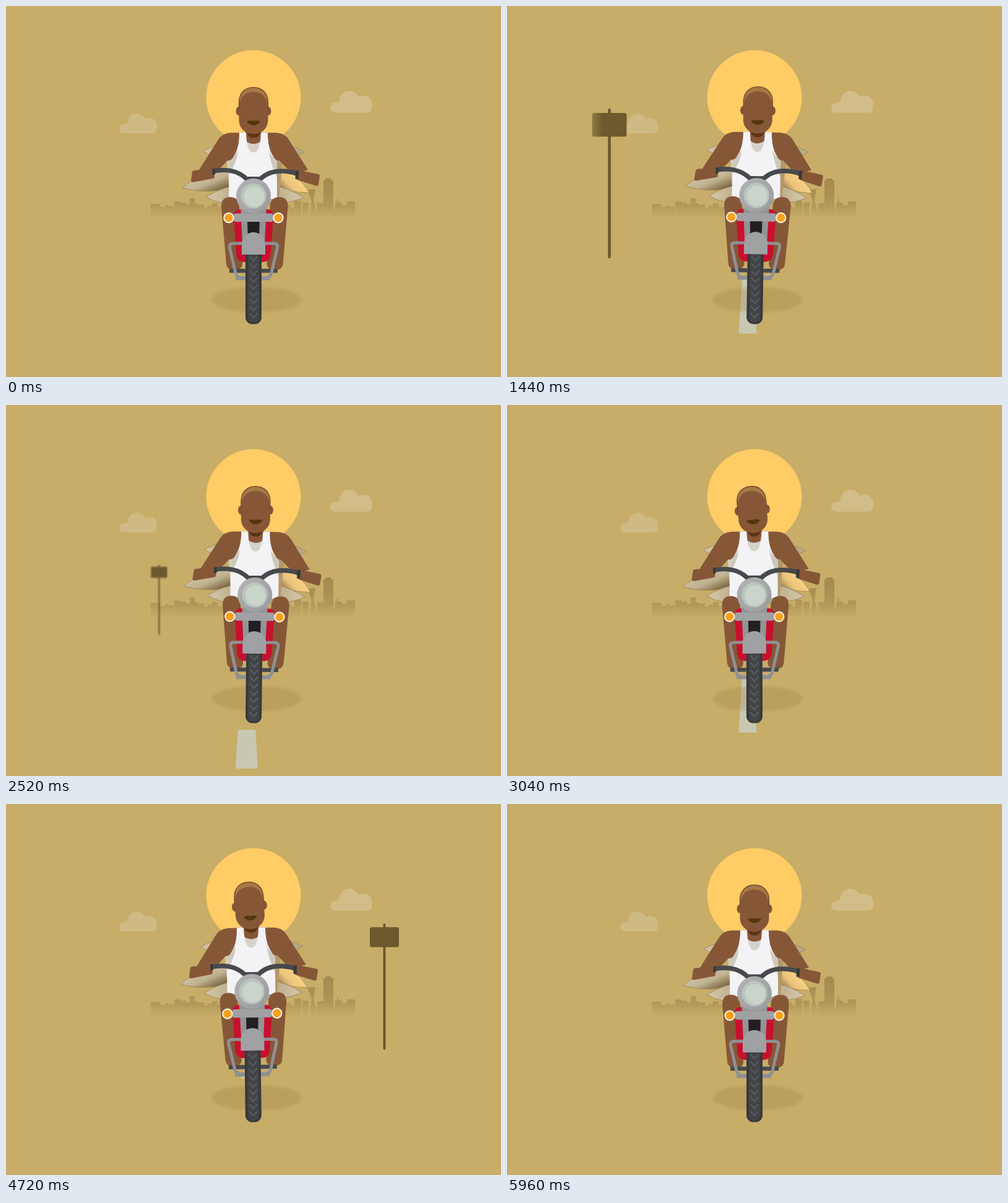
Recreate the animation shown at these times as an HTML page with a canvas. Size 800 px wide and 600 px high, loop 6000 ms.

```html
<!DOCTYPE html>
<html lang="en">
<head>
<meta charset="utf-8">
<title>Desert rider</title>
<style>
html, body { margin: 0; width: 100%; height: 100%; overflow: hidden; background: #c7ad68; }
canvas { display: block; width: 800px; height: 600px; }
</style>
</head>
<body>
<canvas id="stage" width="800" height="600"></canvas>
<script>
const ctx = document.getElementById('stage').getContext('2d');
const LOOP = 6000, STEP = 40, TAU = Math.PI * 2, RAD = Math.PI / 180;
const SKIN = '#865737', GREY = '#a0a1a3', DARK = '#47494c', SIGN = '108,89,45';

const clamp = (v, a = 0, b = 1) => Math.min(b, Math.max(a, v));
const smooth = u => u * u * (3 - 2 * u);

// Eased value through [time, value] keys
function track(t, keys) {
  for (let i = 1; i < keys.length; i++) {
    const [t0, a] = keys[i - 1], [t1, b] = keys[i];
    if (t <= t1) return a + (b - a) * smooth(clamp((t - t0) / (t1 - t0)));
  }
  return keys[keys.length - 1][1];
}

function shape(d, fill, stroke, width = 1) {
  const p = new Path2D(d);
  if (fill) { ctx.fillStyle = fill; ctx.fill(p); }
  if (stroke) { ctx.strokeStyle = stroke; ctx.lineWidth = width; ctx.stroke(p); }
}

function box(x, y, w, h, r, fill) {
  ctx.fillStyle = fill;
  ctx.beginPath();
  ctx.roundRect(x, y, w, h, r);
  ctx.fill();
}

function oval(x, y, rx, ry, fill) {
  ctx.fillStyle = fill;
  ctx.beginPath();
  ctx.ellipse(x, y, rx, ry, 0, 0, TAU);
  ctx.fill();
}

function ramp(x0, y0, x1, y1, ...stops) {
  const g = ctx.createLinearGradient(x0, y0, x1, y1);
  stops.forEach((c, i) => g.addColorStop(i / (stops.length - 1), c));
  return g;
}

// Draws once as is and once mirrored about an axis
function pair(draw, axis = 400) {
  draw();
  ctx.save();
  ctx.translate(2 * axis, 0);
  ctx.scale(-1, 1);
  draw();
  ctx.restore();
}

function cloud(x, y, k, fill) {
  ctx.save();
  ctx.translate(x, y);
  ctx.scale(k, k);
  ctx.fillStyle = fill;
  ctx.beginPath();
  ctx.roundRect(0, 17.5, 61, 14.5, 7.2);
  for (const [cx, cy, r] of [[15, 23, 7.5], [28, 15, 14.7], [48.5, 19.5, 12.5]]) {
    ctx.moveTo(cx + r, cy);
    ctx.arc(cx, cy, r, 0, TAU);
  }
  ctx.fill();
  ctx.restore();
}

// x, top, width
const blocks = [
  [234, 320, 15], [249, 325, 9], [258, 322, 4], [262, 324, 9], [272, 316, 10], [282, 318, 9],
  [291, 321, 6], [297, 311, 8], [305, 319, 4], [309, 321, 11], [320, 326, 6], [326, 323, 7],
  [333, 319, 9], [342, 325, 12], [446, 322, 14], [460, 326, 6], [466, 315, 11], [479, 318, 10],
  [503, 319, 10], [513, 282, 16], [516, 279, 10], [529, 329, 3], [532, 318, 11], [535, 312, 2],
  [543, 322, 8], [551, 316, 13]
];

function city() {
  const fill = ramp(0, 278, 0, 343, 'rgba(140,113,60,.58)', 'rgba(140,113,60,.5)',
    'rgba(140,113,60,.36)', 'rgba(140,113,60,0)');
  ctx.fillStyle = fill;
  ctx.beginPath();
  for (const [x, y, w] of blocks) ctx.rect(x, y, w, 343 - y);
  ctx.fill();
  shape('M487 297 L500 296 L497 315 L504 343 H490 L494 316 Z', fill);
}

function scenery() {
  ctx.fillStyle = '#c7ad68';
  ctx.fillRect(0, 0, 800, 600);
  oval(400, 148, 76.5, 76.5, '#ffcc66');
  cloud(183, 174, 1, '#d0ba84');
  cloud(524, 137, 1.11, '#d2bd88');
  city();
}

function shadow() {
  ctx.save();
  ctx.filter = 'blur(2px)';
  oval(405, 475, 72, 20, 'rgba(150,122,62,.26)');
  ctx.restore();
}

// Road sign that shrinks towards the horizon; hidden near the outer edge
function sign(t, start, x0, dx, edge, inner) {
  const s = 1 - 0.000385 * (t - start);
  if (s < 0.17 || s > 1.31) return;
  const x = x0 + dx * s, y = v => 340 + v * s;
  const fill = ramp(edge, 0, inner, 0, `rgba(${SIGN},0)`, `rgba(${SIGN},1)`);
  ctx.save();
  ctx.globalAlpha = clamp((s - 0.18) / 0.15);
  if (s < 0.62) ctx.filter = `blur(${clamp((0.62 - s) * 9, 0, 1)}px)`;
  ctx.fillStyle = fill;
  ctx.beginPath();
  ctx.roundRect(x - 3 * s, y(-222), 6 * s, 309 * s, 3 * s);
  ctx.roundRect(x - 35.5 * s, y(-213), 71 * s, 49 * s, 5 * s);
  ctx.fill();
  ctx.restore();
}

function road(t) {
  const phase = (t + 371) % 400;
  const top = 588 - 0.69 * phase;
  const bottom = 285 + (top - 285) / 0.643;
  const y0 = Math.max(top, 440), y1 = Math.min(bottom, 588);
  const half = y => 18 * (y - 285) / 303;
  if (y1 > y0) {
    shape(`M${389 - half(y0)} ${y0} L${389 + half(y0)} ${y0} ` +
          `L${389 + half(y1)} ${y1} L${389 - half(y1)} ${y1} Z`, '#c8c7b2');
  }
  // Brief crack at the roadside
  if (t >= 840 && t < 960) {
    const y = 492 - 0.7 * (t - 880), end = Math.min(588, y + 96);
    const at = v => 341.5 - (v - 492) * 0.344;
    shape(`M${at(y)} ${y} L${at(end)} ${end}`, null, '#55482c', 1);
  }
}

function leaves() {
  const line = '#8f7a4e';
  const pale = ramp(318, 0, 372, 0, '#d2c5a3', '#b9a987');
  shape('M318 235 Q333 225 352 225 L356 250 Q338 246 318 235 Z', pale, line, 0.7);
  shape('M483 236 Q466 226 448 225 L444 250 Q464 246 483 236 Z', pale, line, 0.7);
  shape('M285 294 Q312 270 366 262 L374 290 Q330 307 285 294 Z',
    ramp(318, 272, 332, 304, '#d0c4a6', '#bfb08e', '#7c6742'), line, 0.7);
  shape('M490 302 Q474 272 434 255 L426 286 Q452 302 490 302 Z',
    ramp(474, 276, 444, 304, '#fbd384', '#eac47c', '#75603c'), line, 0.7);
  shape('M323 309 Q345 294 378 289 L384 322 Q352 324 323 309 Z',
    ramp(335, 0, 378, 0, '#cfc2a2', '#b6a684'), line, 0.7);
  shape('M481 310 Q458 294 424 288 L418 320 Q452 322 481 310 Z',
    ramp(468, 0, 426, 0, '#cfc2a2', '#b6a684'), line, 0.7);
}

function torso() {
  shape('M374 204 L426 204 L443 250 L438 312 L362 312 L357 250 Z', '#d3cdbd');
  shape('M432 246 L447 252 L441 312 L430 312 Z', '#b3986a');
  shape('M387 203 H413 V222 Q400 240 387 222 Z', SKIN);
  shape('M387 218 Q400 228 413 218 L409 233 Q400 242 391 233 Z', '#d6d2ca');
  shape('M376 205 H388 Q389 237 400 237 Q411 237 412 205 H424 Q425 234 438 247 ' +
        'L438 312 H360 L361 250 Q376 232 376 205 Z', '#f3f3f5');
  shape('M361 249 Q371 242 374 234 Q376 246 361 272 Z', '#cfc9bd');
  shape('M438 249 Q428 242 425 234 Q426 250 438 278 Z', '#cfc9bd');
}

function arms() {
  pair(() => shape('M377 205 H363 Q349 206 343 216 L312 265 L337 272 L358 250 ' +
    'Q364 251 368 243 Q377 230 377 205 Z', SKIN));
  ctx.lineJoin = 'round';
  shape('M304 269 L332 266 L334 276 L302 282 Z', SKIN, SKIN, 6);
  shape('M475 269 L504 275 L502 288 L473 279 Z', SKIN, SKIN, 6);
}

function head(tilt) {
  box(389, 190, 22, 25, 9, SKIN);
  shape('M389 204 Q400 210 411 204 Q409 213 400 213 Q391 213 389 204 Z', '#5a3413');
  ctx.save();
  ctx.translate(400, 206);
  ctx.rotate(tilt * RAD);
  ctx.translate(-400, -206);
  oval(376, 170, 4.5, 7, SKIN);
  oval(424, 170, 4.5, 7, SKIN);
  shape('M376.5 172 V156 C376.5 140 387 131.5 400 131.5 C413 131.5 423.5 140 423.5 156 V172 Z',
    '#a67845', '#68431f', 1.2);
  shape('M376.5 166 C377 148 386 139 400 139 C414 139 423 148 423.5 166 V185 ' +
    'C423 199 412 207 400 207 C388 207 377 199 376.5 185 Z', SKIN);
  shape('M389 186.5 Q395 184.5 400 186 Q405 184.5 411 186.5 Q407 193 400 193 Q393 193 389 186.5 Z',
    '#54360c');
  ctx.restore();
}

function wheel() {
  box(387, 392, 26, 122.5, 11, '#38393b');
  box(391, 396, 18, 116, 8, '#434447');
  for (let y = 405; y < 505; y += 11.5) {
    shape(`M393.5 ${y} L400 ${y + 7} L406.5 ${y}`, null, '#6f7173', 1.1);
  }
}

function frame() {
  pair(() => shape('M348 324 Q348 309 362 309 Q376 309 377 324 L382 418 Q381 427 369 427 ' +
    'Q357 427 356 417 Z', SKIN), 401.8);
  pair(() => shape('M368 340 Q368 330 376 329 H386 L390 414 H384 Q373 413 372 401 Z', '#c8102e'));
  shape('M386 340 H414 L412 372 H388 Z', '#221f21');
  pair(() => {
    shape('M378 300 H392 L390 344 L391 384 H382 Z', '#939496');
    box(361, 425, 26, 6.5, 1, DARK);
    shape('M386 384 H367 Q360 384 361.5 391 L371 432 Q373 439 379 439', null, '#8f9092', 5);
  });
  box(371, 437, 56, 6.5, 1, '#8f9092');
}

function front() {
  shape('M381 402 V385 A19 19 0 0 1 419 385 V402 Z', GREY);
  box(380, 310, 40, 26, 2, '#939496');
  box(368, 335.5, 64, 13.5, 4, GREY);
  pair(() => {
    oval(360, 342.5, 8.7, 8.7, '#f8f2e6');
    oval(360, 342.5, 6.6, 6.6, '#f9a11f');
  });
  ctx.lineCap = 'butt';
  shape('M335 267 C351 264 374 264 390 281 H410 C426 264 450 265 471 271', null, DARK, 7.5);
  shape('M335.5 263 V273', null, '#36383b', 4);
  shape('M471 266 L470 280', null, '#36383b', 5);
  box(387, 276, 26, 12, 4, DARK);
  oval(400, 307, 28, 28, ramp(376, 285, 424, 330, '#b0b1b2', '#9b9c9e'));
  oval(400, 307, 20.5, 20.5, '#bcc4be');
  oval(401, 308, 16.5, 16.5, '#c9d4cb');
}

function rider(t) {
  const lean = track(t, [[0, 0], [1900, 1.07], [4000, -1.03], [LOOP, 0]]);
  const tilt = track(t, [[2300, 0], [3700, -8.5], [5500, 0]]);
  const bob = (1 - Math.cos(TAU * (t - 10) / 500)) / 2;
  // The sprung parts ride up and down over the wheel
  const sprung = draw => {
    ctx.save();
    ctx.translate(0, -2.6 * bob);
    ctx.scale(1, 1 + 0.008 * bob);
    ctx.translate(-400, -514);
    draw();
    ctx.restore();
  };
  ctx.save();
  ctx.translate(400, 514);
  ctx.rotate(lean * RAD);
  sprung(() => {
    leaves();
    torso();
    arms();
    head(tilt);
    frame();
  });
  ctx.save();
  ctx.translate(-400, -514);
  wheel();
  ctx.restore();
  sprung(front);
  ctx.restore();
}

function draw(now) {
  const t = Math.floor((now % LOOP) / STEP) * STEP;
  scenery();
  sign(t, 880, 320, -197, 111, 155);
  sign(t, 3840, 474, 208, 687, 643);
  road(t);
  shadow();
  rider(t);
}

const begin = performance.now();
function tick() {
  draw(performance.now() - begin);
  requestAnimationFrame(tick);
}
tick();
</script>
</body>
</html>
```
